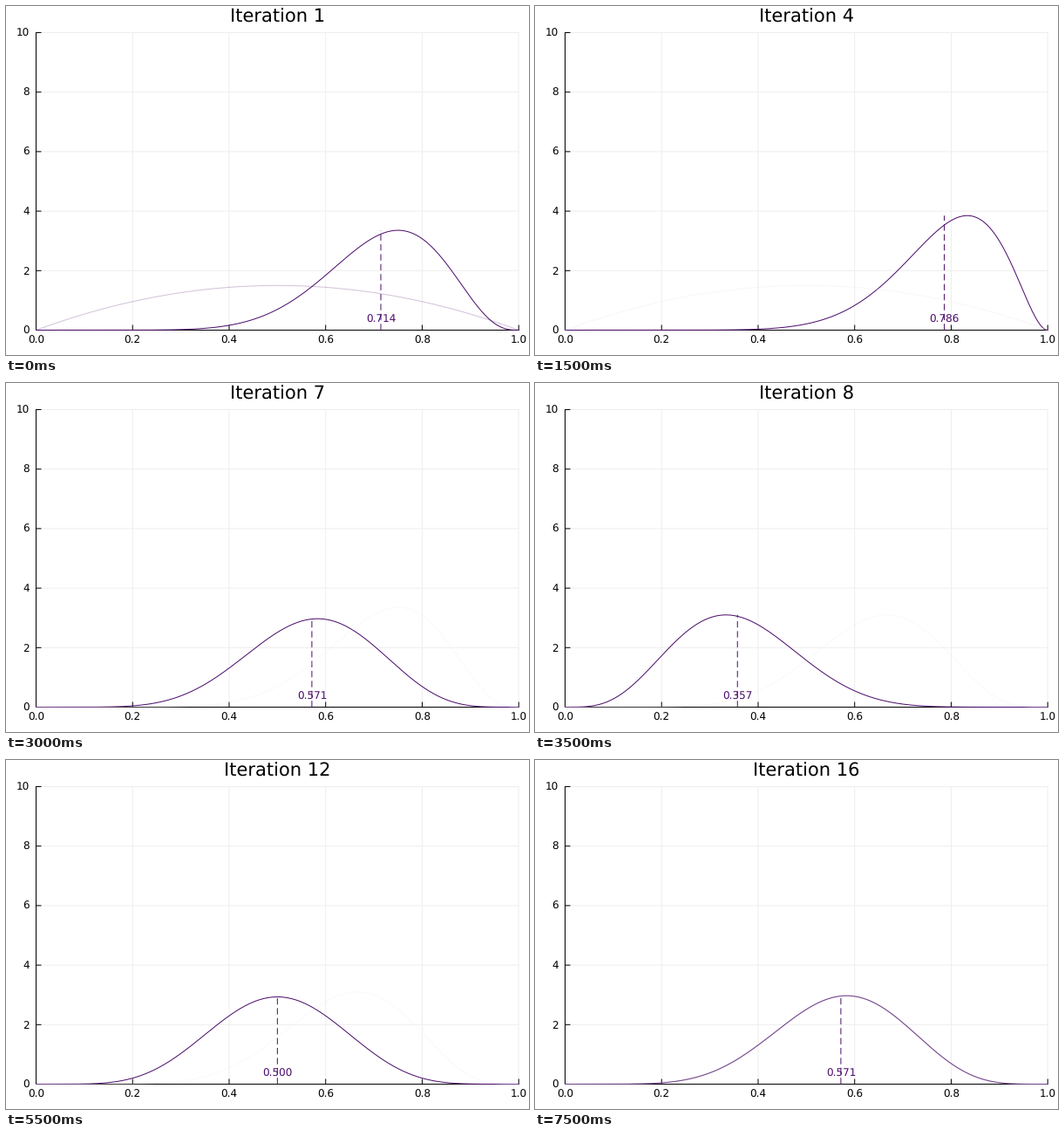
A matplotlib script for the animation above (8000 ms loop, 600 by 400 pixels).

```python
from math import factorial

import matplotlib.pyplot as plt
import numpy as np
from matplotlib.animation import FuncAnimation

W, H, DPI = 600, 400, 100
PX = 72 / DPI                                # points per pixel
LEFT, RIGHT, TOP, BOTTOM = 34.5, 588.2, 30.5, 371.5
PURPLE = "#4b0c6b"
GRID = "#eeeeee"

TOTAL = 14                                   # a + b of every posterior
LAG = 6                                      # age at which a curve shows up again
SUCCESSES = [10, 9, 7, 11, 7, 9, 8, 5, 8, 8, 9, 7, 7, 7, 9, 8]

plt.rcParams.update({"font.family": "DejaVu Sans", "path.snap": False,
                     "text.hinting": "none", "text.hinting_factor": 1})
xs = np.linspace(0, 1, 401)


def beta_pdf(x, a, b):
    norm = factorial(a + b - 1) / (factorial(a - 1) * factorial(b - 1))
    return norm * x ** (a - 1) * (1 - x) ** (b - 1)


def posterior(i):
    a = SUCCESSES[i]
    return beta_pdf(xs, a, TOTAL - a)


def px(x):
    return LEFT + x * (RIGHT - LEFT)


def py(y):
    return BOTTOM - y / 10 * (BOTTOM - TOP)


fig = plt.figure(figsize=(W / DPI, H / DPI), dpi=DPI, facecolor="white")
ax = fig.add_axes([0, 0, 1, 1])
ax.set(xlim=(0, W), ylim=(H, 0))             # plot in pixels from the top left
ax.axis("off")


def line(x=(), y=(), color="black", width=1.0, **kw):
    return ax.plot(x, y, color=color, lw=width * PX, **kw)[0]


def label(x, y, text="", size=11.8, ha="center", **kw):
    return ax.text(x, y, text, fontsize=size * PX, ha=ha, va="baseline", **kw)


for t in np.linspace(0, 1, 6):
    x = px(t)
    line([x, x], [TOP, BOTTOM], GRID, zorder=0)
    line([x, x], [BOTTOM, BOTTOM - 5.5], zorder=2)
    label(x, 387, f"{t:.1f}")
for t in range(0, 11, 2):
    y = py(t)
    line([LEFT, RIGHT], [y, y], GRID, zorder=0)
    line([LEFT, LEFT + 5.5], [y, y], zorder=2)
    label(27.2, y + 4.3, f"{t}", ha="right")
line([LEFT, LEFT, RIGHT], [TOP, BOTTOM, BOTTOM], zorder=2)

title = label(311.5, 19, size=20.6)
curve = line(color=PURPLE, zorder=3)
ghost = line(alpha=0.25, zorder=4)
mean_line = line(color=PURPLE, zorder=3, dashes=(7.3, 4.1),
                 dash_capstyle="butt")
mean_text = label(0, 363, color=PURPLE, zorder=5)


def draw(i):
    mean = SUCCESSES[i] / TOTAL
    pdf = posterior(i)
    title.set_text(f"Iteration {i + 1}")
    curve.set_data(px(xs), py(pdf))

    if i < LAG:
        ghost.set_data(px(xs), py(beta_pdf(xs, 2, 2)))
        ghost.set_color(PURPLE if i == 0 else "#f5dcdc")
    else:
        ghost.set_data(px(xs), py(posterior(i - LAG)))
        ghost.set_color("#ebebed")

    mean_line.set_data([px(mean)] * 2, [BOTTOM, py(pdf.max())])
    mean_text.set_x(px(mean))
    mean_text.set_text(f"{mean:.3f}")
    return title, curve, ghost, mean_line, mean_text


anim = FuncAnimation(fig, draw, frames=len(SUCCESSES), interval=500,
                     repeat=True, repeat_delay=0, blit=False)
plt.show()
```
